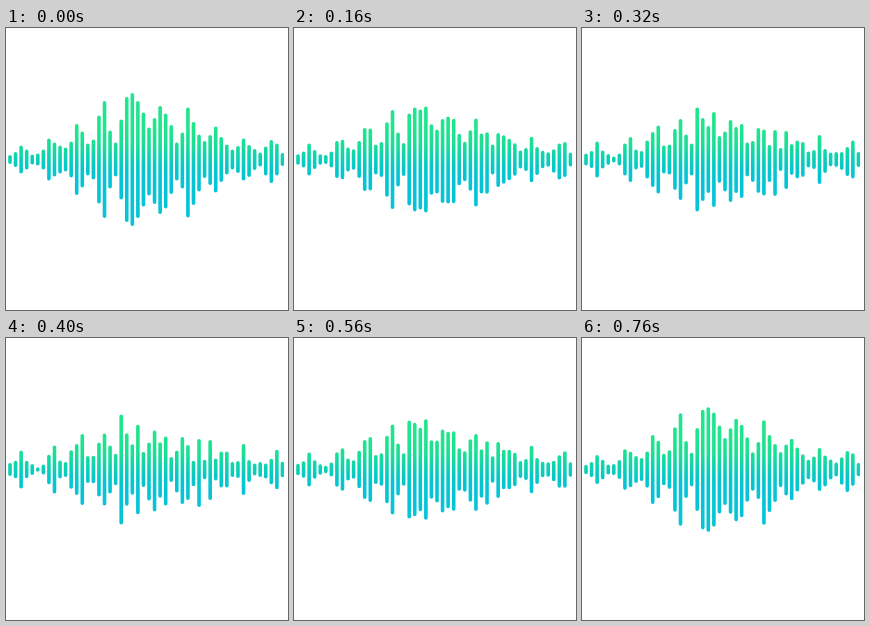
These frames come from a looping animation (282x282 px, 0.8 s). An HTML page with a canvas:

```html
<!DOCTYPE html>
<html lang="en">
<head>
<meta charset="utf-8">
<title>Sound wave</title>
<style>
  html, body { margin: 0; width: 100%; height: 100%; overflow: hidden; background: #fff; }
  canvas { display: block; width: 282px; height: 282px; }
</style>
</head>
<body>
<canvas id="stage" width="282" height="282"></canvas>
<script>
const ctx = document.getElementById('stage').getContext('2d');
const LOOP = 800, STEP = 40;
const FIRST_X = 4, PITCH = 5.56, WIDTH = 3.6, MID_Y = 131.5;

// Bar heights at the two ends of the swing
const start = [
  9, 15, 28, 20, 10, 12, 20, 42, 34, 28, 24, 36, 71, 56, 32, 40, 88,
  117, 58, 34, 80, 125, 133, 117, 94, 68, 86, 108, 95, 69, 38, 56, 110,
  83, 57, 37, 50, 66, 45, 30, 20, 27, 42, 32, 21, 14, 29, 43, 32, 13];
const end = [
  13, 17.5, 38, 17.5, 11, 4.5, 10, 29.5, 48, 18, 15, 38.5, 51, 71, 27, 27.5, 54,
  72, 48, 31.5, 110, 72.5, 50.5, 89.5, 35, 58, 81, 55.5, 69, 25, 42, 67, 55,
  25.5, 68, 19.5, 60, 22, 36, 36, 15, 17, 51, 22, 12, 15, 15, 25.5, 39.5, 15.5];

// Bars that sit a little below the middle line
const shift = { 25: 2, 26: 1.5, 27: .5, 28: 1.5, 30: 2, 31: 1, 32: 3, 33: 4, 34: 3.5, 36: .5, 43: 1.5, 46: 1.5, 47: 2 };

const fill = ctx.createLinearGradient(0, 100, 0, 152);
fill.addColorStop(0, '#1fe58c');
fill.addColorStop(.3, '#1bdf95');
fill.addColorStop(.75, '#05c8c8');
fill.addColorStop(1, '#04c4d6');

function draw(time) {
  const phase = Math.floor(time % LOOP / STEP) * STEP / LOOP;
  const swing = 1 - Math.abs(1 - 2 * phase);
  ctx.clearRect(0, 0, 282, 282);
  ctx.save();
  ctx.beginPath();
  ctx.rect(2, 0, 276, 282);
  ctx.clip();
  ctx.fillStyle = fill;
  ctx.beginPath();
  start.forEach((from, i) => {
    const height = from + (end[i] - from) * swing;
    const y = MID_Y + (shift[i] || 0) - height / 2;
    ctx.roundRect(FIRST_X + i * PITCH - WIDTH / 2, y, WIDTH, height, WIDTH / 2);
  });
  ctx.fill();
  ctx.restore();
}

function frame() {
  draw(performance.now());
  requestAnimationFrame(frame);
}
frame();
</script>
</body>
</html>
```
